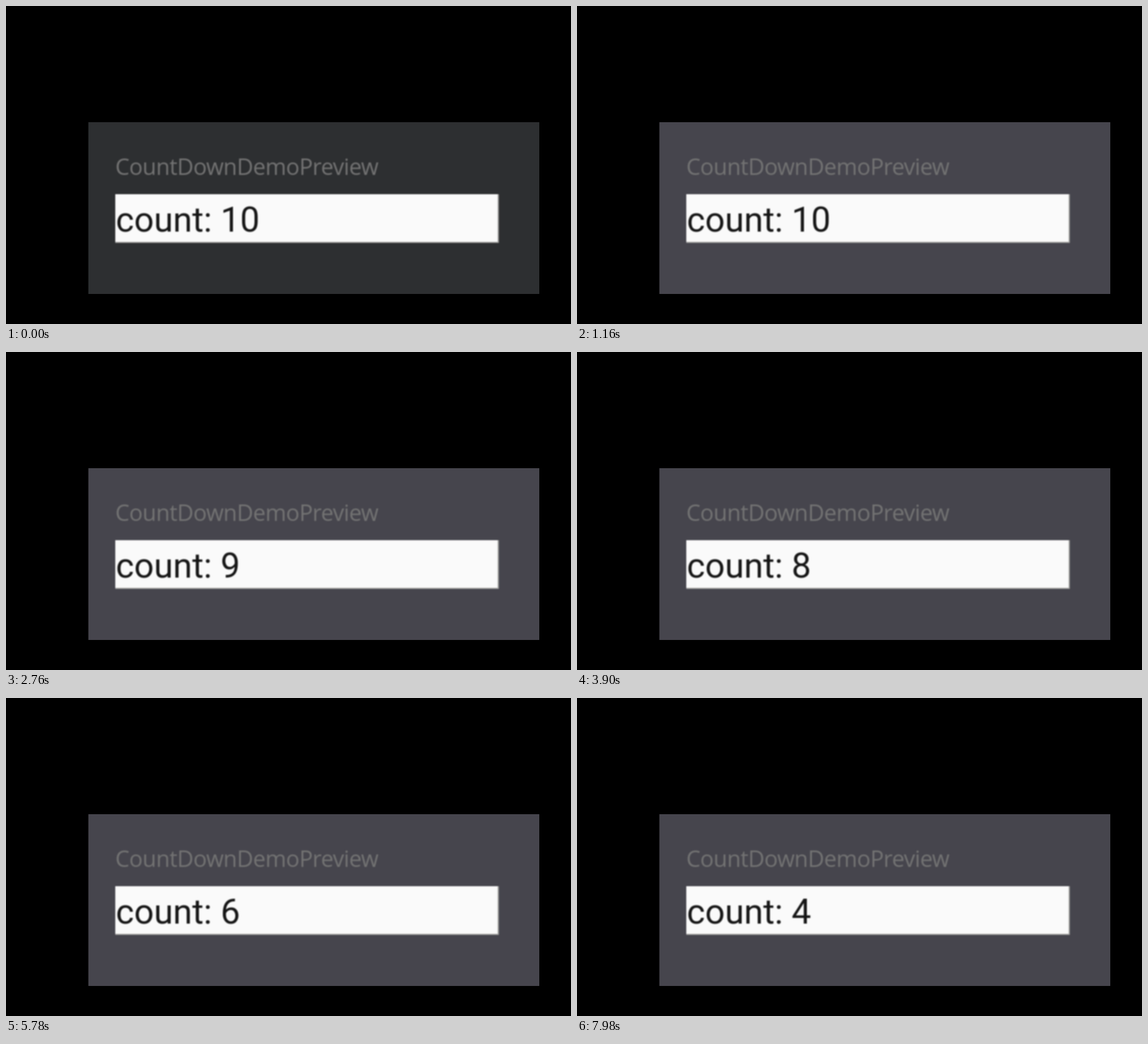
An HTML page for the animation above (8000 ms loop, 998 by 561 pixels).

```html
<!DOCTYPE html>
<html lang="en">
<head>
<meta charset="utf-8">
<title>Countdown preview</title>
<style>
  html, body { margin: 0; width: 100%; height: 100%; overflow: hidden; background: #000; }
  svg { display: block; }
  .soft { filter: blur(0.8px); }
  .title { font: 40px "Open Sans", "Noto Sans", sans-serif; letter-spacing: -0.68px; fill: #737373; }
  .count { font: 61.4px Roboto, sans-serif; fill: #161616; white-space: pre; }
</style>
</head>
<body>
<svg width="998" height="561" viewBox="0 0 998 561">
  <rect id="panel" x="145.5" y="205" width="796.5" height="303" fill="#2d2f31"/>
  <g class="soft">
    <text class="title" x="193" y="298">CountDownDemoPreview</text>
    <rect x="193" y="332" width="677.5" height="86" fill="#a2a2a0"/>
    <rect x="193" y="332" width="675.5" height="84" fill="#fafafa"/>
    <text class="count" id="count" x="194" y="398">count: 10</text>
  </g>
</svg>
<script>
  const LOOP = 8000;
  const ACTIVE_AT = 240;      // panel brightens
  const FIRST_TICK = 2500;    // 10 becomes 9
  const TICK = 1000;
  const panel = document.getElementById("panel");
  const label = document.getElementById("count");

  function draw() {
    const t = performance.now() % LOOP;
    const ticks = Math.max(0, Math.floor((t - FIRST_TICK) / TICK) + 1);
    panel.setAttribute("fill", t < ACTIVE_AT ? "#2d2f31" : "#46454d");
    label.textContent = `count: ${10 - ticks}`;
    requestAnimationFrame(draw);
  }
  draw();
</script>
</body>
</html>
```
